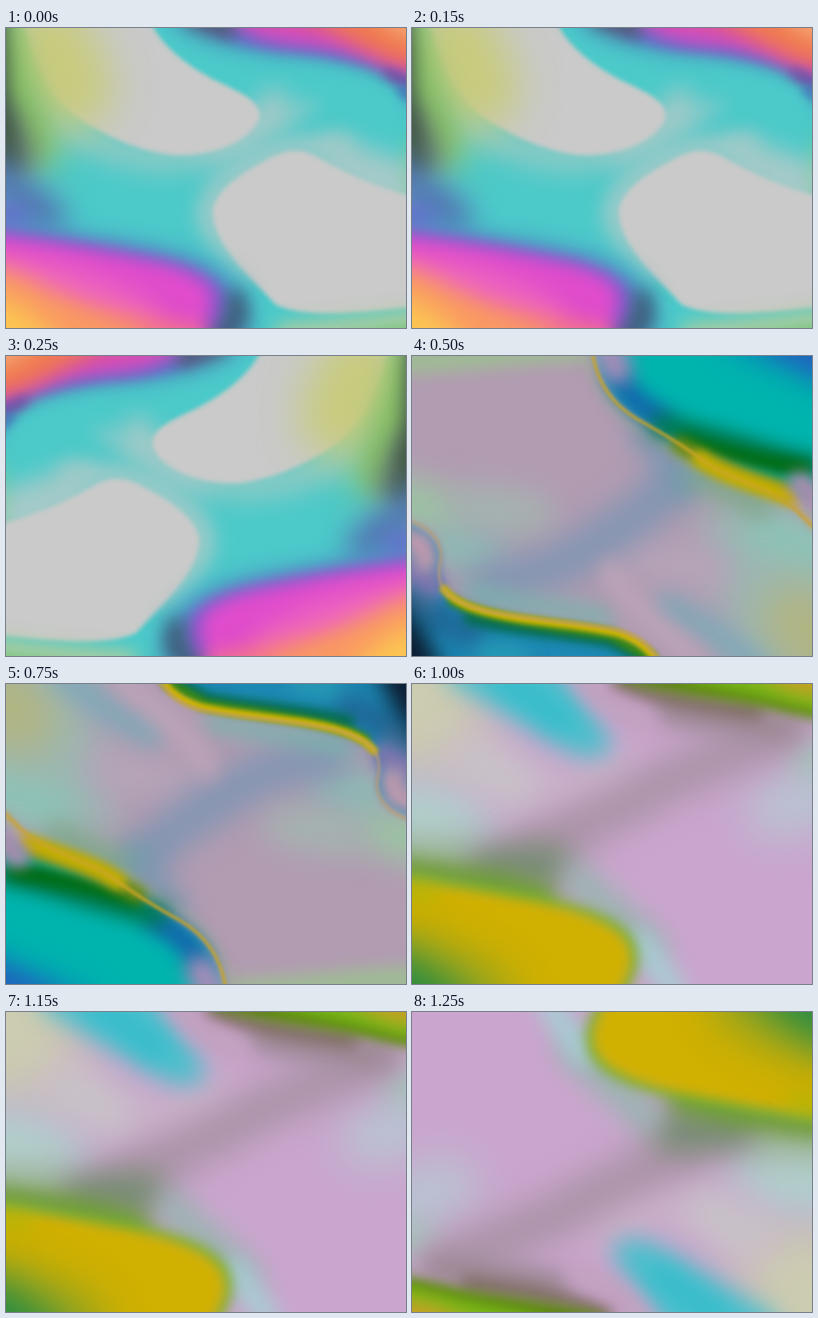
Recreate the animation shown at these times as an HTML page. Size 400 by 300 pixels, loop 1500 ms.

```html
<!DOCTYPE html>
<html lang="en">
<head>
<meta charset="utf-8">
<title>Liquid colours</title>
<style>
  html, body { margin: 0; width: 100%; height: 100%; overflow: hidden; }
  svg { display: block; width: 100vw; height: 100vh; }
</style>
</head>
<body>
<svg id="stage" viewBox="0 0 400 300" preserveAspectRatio="none"><defs id="defs"></defs></svg>
<script>
const stage = document.getElementById('stage');
const defs = document.getElementById('defs');
const HOLD = 250;
const MIRROR = 'matrix(-1 0 0 1 400 0)';
const TURN = 'rotate(180 200 150)';

function add(parent, tag, attrs) {
  const node = document.createElementNS('http://www.w3.org/2000/svg', tag);
  for (const key in attrs) node.setAttribute(key, attrs[key]);
  return parent.appendChild(node);
}

function blurFilter(size) {
  const id = 'blur' + size;
  if (!document.getElementById(id)) {
    const filter = add(defs, 'filter', {
      id, filterUnits: 'userSpaceOnUse', x: -80, y: -80, width: 560, height: 460,
      'color-interpolation-filters': 'sRGB'
    });
    add(filter, 'feGaussianBlur', { stdDeviation: size });
  }
  return `url(#${id})`;
}

// A layer is [blur, colour, path, stroke width]; without a width the path is filled.
function makeScene(base, layers) {
  const group = add(stage, 'g', { display: 'none' });
  add(group, 'rect', { width: 400, height: 300, fill: base });
  for (const [blur, colour, d, width] of layers) {
    const paint = width
      ? { fill: 'none', stroke: colour, 'stroke-width': width, 'stroke-linecap': 'round', 'stroke-linejoin': 'round' }
      : { fill: colour };
    add(group, 'path', { d, filter: blurFilter(blur), ...paint });
  }
  return group;
}

const upperPool = 'M145 -60V-6C156 20 187 42 217 56C246 69 257 79 253 92C244 113 205 130 165 127C132 122 110 112 85 98C55 80 20 50 10 -60Z';
const lowerPool = 'M460 190L400 167C360 155 335 142 315 131C295 119 280 121 260 132C225 150 203 170 207 190C212 220 245 250 270 277C300 290 350 288 460 272Z';

const neon = makeScene('#4ccaca', [
  [12, '#a4cac8', 'M330 108L390 130 460 140V200H400L300 135Z'],
  [10, '#78c888', 'M418 115V165', 26],
  [20, '#86c896', 'M-60 -60H50L50 110 55 140 -60 170Z'],
  [14, '#98cac4', 'M55 90C90 122 140 134 190 126', 26],
  [12, '#a8cac8', 'M205 122C240 114 262 98 268 76', 30],
  [10, '#a8cac8', 'M265 95L305 78', 10],
  [10, '#a4cac8', 'M245 240C212 212 198 195 204 178C212 152 250 132 285 120L335 118', 22],
  [2, '#c9cac9', upperPool],
  [2, '#c9cac9', lowerPool],
  [20, '#c8cb7c', 'M45 15L65 60', 84],
  [14, '#86be62', 'M-6 10L12 70 28 115', 36],
  [12, '#647c70', 'M0 95L14 130', 32],
  [9, '#405444', 'M-14 -8L-10 60 -4 100 0 140', 26],
  [14, '#5478b4', 'M-10 148L20 172 40 188', 40],
  [10, '#7060d0', 'M-20 182L12 192', 22],
  [9, '#b4cc9c', 'M278 306C330 302 370 298 430 288', 20],
  [6, '#84c46c', 'M335 314L430 300', 12],
  [12, '#4c8cc4', 'M-60 180C40 206 80 207 130 216C190 227 234 244 240 282V360H-60Z'],
  [8, '#9058d0', 'M-60 190C40 210 85 215 130 225C180 234 222 248 222 280L212 360H-60Z'],
  [8, '#e04ccc', 'M-60 202C40 216 85 222 130 232C175 240 208 252 204 276L186 360H-60Z'],
  [12, '#ee68bc', 'M-60 222C30 228 90 242 150 278L165 360H-60Z'],
  [11, '#f47c7c', 'M50 290L120 300 190 312', 24],
  [11, '#f99a62', 'M-60 226L10 244 70 275 135 302V360H-60Z'],
  [12, '#fcc452', 'M-60 250L15 278 55 310 60 360H-60Z'],
  [9, '#3c5c74', 'M216 308L232 290 230 272', 20],
  [9, '#4aa8c4', 'M158 -60V-8C180 14 215 27 280 31C330 34 370 43 392 58L415 95 460 110V-60Z'],
  [6, '#6070c8', 'M185 -60V-10C210 13 245 22 290 25C335 29 375 40 395 54L460 90V-60Z'],
  [8, '#505c70', 'M188 -10L222 0', 20],
  [8, '#d04cc4', 'M228 -60V-4C250 15 280 17 310 20C350 26 375 36 400 48L460 60V-60Z'],
  [10, '#e05c80', 'M240 -60V-12C290 -4 325 4 350 17L400 40 460 45V-60Z'],
  [10, '#f07c50', 'M310 -60V-12C335 5 360 17 390 32L460 38V-60Z'],
  [9, '#f4a470', 'M385 -12L420 4', 26],
  [6, '#6c489c', 'M382 45L412 60', 9],
  [5, '#4478bc', 'M396 62L412 74', 10]
]);

const upperSeam = 'M181 -30V0C186 28 200 48 225 63C252 78 272 90 290 104C320 126 365 132 390 160L425 192';
const lowerSeam = 'M-20 160C15 166 34 184 28 208C22 236 42 246 70 254C110 264 165 266 200 273C224 278 235 288 245 302L260 330';

const oilSlick = makeScene('#b29cb2', [
  [9, '#9cc090', 'M-40 4C30 10 90 -6 190 -8', 22],
  [16, '#9cc4a4', 'M-50 120L10 122 55 148 40 180 -50 165Z'],
  [16, '#a4b4b0', 'M60 150L120 160', 44],
  [15, '#8cbcb4', 'M30 190L75 200', 40],
  [20, '#9cb8b4', 'M290 140L345 150 440 180 460 330 330 330 300 220Z'],
  [16, '#8cc4b8', 'M350 172L420 200', 40],
  [22, '#b2b480', 'M385 265L430 300', 75],
  [16, '#b6a4b8', 'M225 200L300 215', 42],
  [15, '#8496b2', 'M268 112C250 150 205 172 170 196C140 216 105 222 75 226', 44],
  [11, '#8098b0', 'M228 78L268 118', 24],
  [11, '#749cac', 'M285 112L268 132', 24],
  [11, '#80a88c', 'M290 122L350 150', 26],
  [10, '#74b4ac', 'M60 236C100 250 150 252 195 262', 16],
  [11, '#80a8b8', 'M255 250L300 275 345 310', 26],
  [9, '#bca4b8', 'M198 215C215 250 250 270 285 305', 20],
  [6, '#a4b494', 'M176 -10C180 25 197 50 224 68C250 82 270 96 284 110', 7],
  [4, '#00b4ae', 'M184 -60V0C190 28 205 46 230 62C265 80 300 100 330 116L400 142 460 160V-60Z'],
  [16, '#0a86bc', 'M285 -60L320 -8 380 14 460 50V-60Z'],
  [13, '#2460bc', 'M365 -20L430 12', 32],
  [9, '#1464ac', 'M204 18C212 38 226 50 250 64', 24],
  [9, '#007850', 'M250 70C295 80 330 92 365 102L430 118', 24],
  [6, '#006c14', 'M272 85C310 95 340 104 390 112', 17],
  [9, '#a48cb8', 'M190 -16L204 12', 32],
  [6, '#809014', 'M268 90C300 108 330 122 374 134', 16],
  [5, '#c8b000', 'M288 103C310 120 345 128 378 142', 16],
  [1.5, '#c8a428', upperSeam, 3],
  [7, '#a88cac', 'M388 128L420 158', 25],
  [3, '#c8a050', 'M380 146L402 172', 4],
  [3, '#1c88b4', 'M-40 160C12 166 32 184 28 208C24 236 46 248 75 256C120 266 165 266 200 275L245 304 260 360H-40Z'],
  [10, '#206898', 'M20 258L60 278', 28],
  [10, '#2ca4b4', 'M70 296L110 302', 14],
  [7, '#7c78b0', 'M-10 212L18 228', 32],
  [7, '#bc98ac', 'M-20 178L10 188 14 204', 26],
  [9, '#486890', 'M-12 238L16 250', 14],
  [11, '#0c1c30', 'M-25 258L-5 288 10 320', 42],
  [5, '#066c50', 'M58 262C110 275 160 276 200 285L236 304', 14],
  [3, '#3c8814', 'M40 245C65 261 130 269 200 280L238 302', 9],
  [2, '#d0b400', 'M32 233C44 250 75 257 105 262C145 268 175 270 205 277C224 283 235 291 244 304', 8],
  [1.5, '#c09c70', lowerSeam, 2]
]);

const mustardEdge = 'M-60 194C0 196 50 204 90 212C150 222 205 236 216 262C222 278 216 290 205 312V360H-60Z';

const pastel = makeScene('#caa6ce', [
  [26, '#ccccb0', 'M-60 -60H60L80 60 30 90 -60 90Z'],
  [20, '#b0d0cc', 'M-60 95L40 100 90 135 70 165 -60 170Z'],
  [18, '#c8c4c8', 'M60 75L115 105', 50],
  [18, '#ccb4c8', 'M150 112L205 85', 40],
  [22, '#b8c4d2', 'M365 125L430 100', 60],
  [14, '#a4c4b8', 'M392 72L430 80', 34],
  [16, '#ac94a8', 'M375 44C330 68 280 82 235 108C190 136 150 145 110 175', 46],
  [11, '#9c8894', 'M255 28C300 38 340 42 375 44', 26],
  [15, '#98bc98', 'M-30 166L50 170', 28],
  [15, '#788c74', 'M75 184L140 182', 46],
  [13, '#9ab4b0', 'M165 195C190 220 215 236 240 266', 32],
  [12, '#48c0cc', 'M35 -60V-4C75 18 115 44 150 64C180 80 202 74 198 55C188 35 165 15 148 -12V-60Z'],
  [10, '#38bccc', 'M95 -4L150 36', 24],
  [9, '#c0a0bc', 'M170 -8C185 16 205 28 230 38', 18],
  [10, '#a8ccd4', 'M228 258L262 305', 24],
  [10, '#6c9c34', 'M-30 184C30 186 80 200 130 212', 26],
  [7, '#78b02c', mustardEdge, 15],
  [6, '#d0b000', mustardEdge],
  [10, '#a8b80c', 'M-30 202L20 210', 12],
  [20, '#94a420', 'M-60 240L20 252 95 290 110 360H-60Z'],
  [18, '#2c8c40', 'M-60 258L0 272 55 310 50 360H-60Z'],
  [8, '#746454', 'M205 -4C240 14 290 22 345 28', 14],
  [6, '#5c8410', 'M205 -60V-4C240 8 290 14 345 22L400 34 460 48V-60Z'],
  [7, '#78b818', 'M265 -60V-6C300 4 345 10 400 26L460 36V-60Z'],
  [9, '#c8a024', 'M335 -60V-14L380 8 460 22V-60Z']
]);

const poses = [
  [neon, ''], [neon, MIRROR],
  [oilSlick, ''], [oilSlick, TURN],
  [pastel, ''], [pastel, TURN]
];
let current = -1;

function draw(time) {
  const index = Math.floor(time / HOLD) % poses.length;
  if (index === current) return;
  if (current >= 0) poses[current][0].setAttribute('display', 'none');
  const [scene, transform] = poses[index];
  scene.setAttribute('transform', transform);
  scene.setAttribute('display', 'inline');
  current = index;
}

const start = performance.now();
function tick() {
  draw(performance.now() - start);
  requestAnimationFrame(tick);
}
tick();
</script>
</body>
</html>
```
